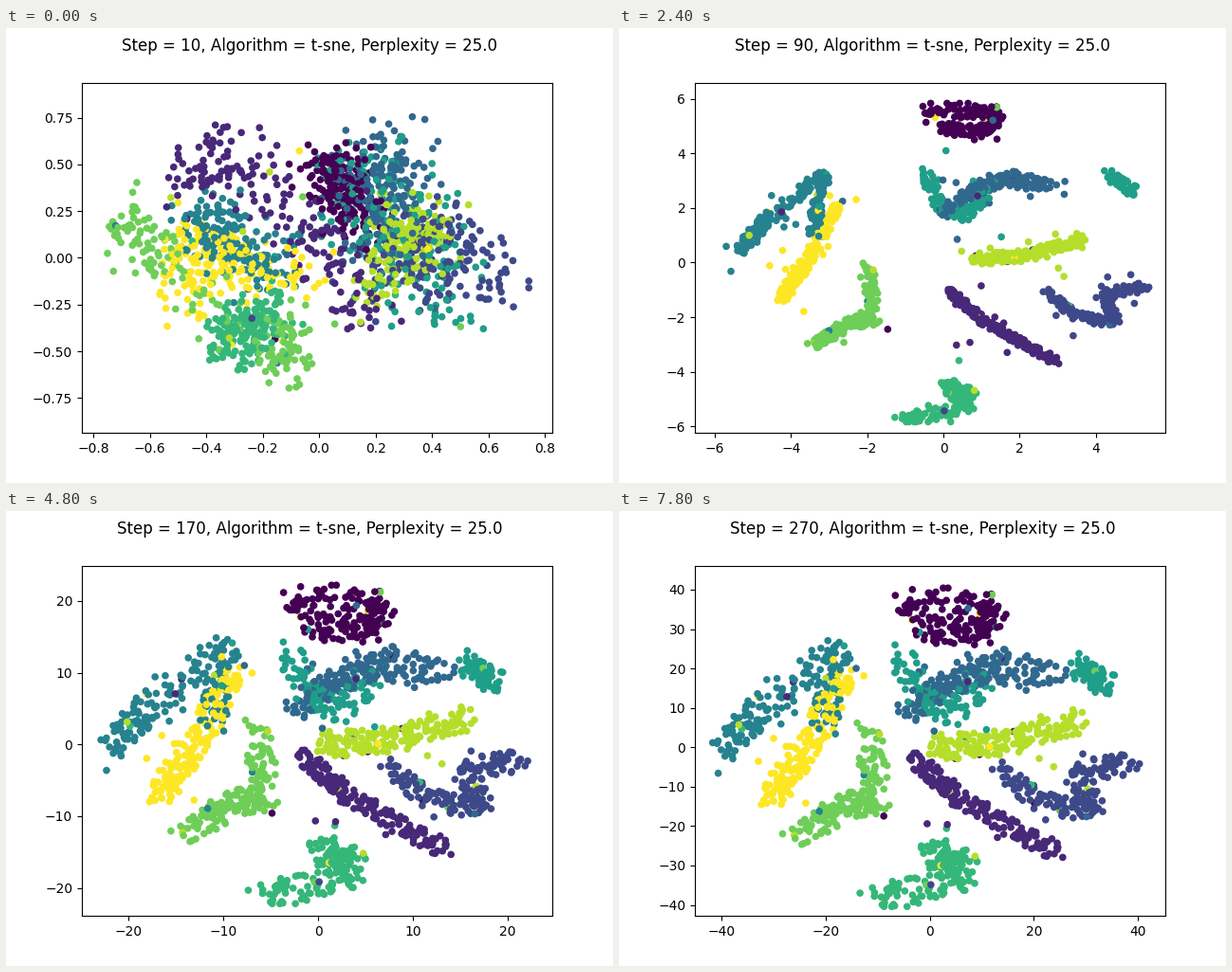
A matplotlib script that plays this animation: 640x480 px, repeating every 8 s.

```python
import numpy as np
import matplotlib.pyplot as plt
from matplotlib.animation import FuncAnimation

W, H, DPI = 640, 480, 100
INTERVAL, HOLD, FRAMES = 100, 3, 80
AXES_SIZE = np.array([W * 0.775, H * 0.77])
ZERO = np.array([332, 242])          # where data (0, 0) sits on the stage
FIRST, LAST = (103, 74), (553, 410)  # corners of the populated area

rng = np.random.default_rng(7)
poses, labels = [], []


def along(points, u):
    """Walk a polyline; u runs from 0 to 1."""
    leg = u * (len(points) - 1)
    return np.column_stack([np.interp(leg, range(len(points)), axis)
                            for axis in zip(*points)])


def linger(u, legs):
    """Slow down near the key points, so that a path breaks into clumps."""
    leg = np.minimum((u * legs).astype(int), legs - 1)
    t = u * legs - leg
    return (leg + t * t * (3 - 2 * t)) / legs


def group(label, n, cloud, blur, path, brush):
    """Points of one digit: blurred cloud, tight strand, spread-out island."""
    u = (np.arange(n) + 0.5) / n
    start = along(cloud, linger(u, len(cloud) - 1)) + rng.normal(0, blur, (n, 2))

    angle = rng.uniform(0, 2 * np.pi, n)
    radius = brush * np.sqrt(rng.random(n))
    disc = np.column_stack([radius * np.cos(angle), radius * np.sin(angle)])
    stray = (rng.random((n, 1)) < 0.06) * rng.normal(0, 18, (n, 2))

    line, centre = along(path, u), np.mean(path, axis=0)
    tight = ZERO + 1.1 * (centre - ZERO) + 0.75 * (line - centre) + 0.45 * disc
    keys = [start, tight + stray, tight + stray, line + disc + stray]
    keys = (np.clip(keys, FIRST, LAST) - ZERO) * [1, -1] / AXES_SIZE
    poses.append(np.concatenate([keys, keys[-1:]]))
    labels.extend([label] * n)


group(0, 180, [(345, 152), (355, 165), (375, 200)], 18,
      [(292, 92), (400, 95), (390, 118), (320, 118)], 16)
group(1, 180, [(190, 154), (240, 140), (330, 220), (386, 304)], 17,
      [(320, 256), (365, 297), (468, 354)], 11)
group(2, 180, [(410, 235), (425, 245), (480, 230), (520, 260)], 25,
      [(410, 265), (450, 300), (505, 308), (490, 268), (548, 258)], 13)
group(3, 180, [(400, 215), (392, 165), (406, 128)], 24,
      [(312, 205), (350, 170), (400, 155), (455, 165)], 19)
group(4, 180, [(205, 200), (235, 222), (290, 248)], 18,
      [(115, 245), (150, 205), (235, 135), (220, 220)], 16)
group(5, 110, [(420, 225), (380, 150)], 30,
      [(300, 145), (320, 190), (360, 205), (390, 175)], 17)
group(5, 70, [(435, 250), (460, 280)], 30,
      [(487, 155), (520, 178)], 14)
group(6, 180, [(280, 295), (240, 328), (260, 318)], 16,
      [(268, 400), (365, 385), (335, 352), (370, 365)], 16)
group(7, 180, [(132, 205), (155, 240), (295, 355), (300, 320)], 17,
      [(190, 333), (240, 305), (275, 300), (268, 225)], 16)
group(8, 180, [(390, 265), (437, 214), (430, 222)], 20,
      [(335, 242), (410, 238), (490, 214)], 14)
group(9, 180, [(195, 284), (200, 225), (245, 255), (315, 260)], 18,
      [(165, 295), (200, 245), (245, 160)], 15)

order = rng.permutation(len(labels))
POSES = np.concatenate(poses, axis=1)[:, order]
LABELS = np.array(labels)[order]
mixed = rng.random(len(LABELS)) < 0.025
LABELS[mixed] = rng.integers(0, 10, mixed.sum())

# Per pose: its step and the axis limits; between poses, an easing power.
KEY_STEPS = [10, 50, 90, 130, 270]
LIMITS = np.array([  # x min, x max, y min, y max
    (-0.841, 0.826, -0.936, 0.937),
    (-6.05, 5.70, -5.17, 5.83),
    (-6.52, 5.82, -6.24, 6.59),
    (-14.73, 14.36, -14.41, 14.28),
    (-45.2, 45.3, -42.8, 46.1)])
EASING = [2, 1, 0.7, 1.21]

fig, ax = plt.subplots(figsize=(W / DPI, H / DPI), dpi=DPI)
title = fig.suptitle("", fontsize=12)
dots = ax.scatter(*POSES[0].T, c=LABELS, s=20, cmap="viridis", vmin=0, vmax=9)


def update(frame):
    step = 10 + 10 * (frame // HOLD)
    k = min(np.searchsorted(KEY_STEPS, step, side="right") - 1, len(EASING) - 1)
    t = (step - KEY_STEPS[k]) / (KEY_STEPS[k + 1] - KEY_STEPS[k])
    t = 1 - (1 - t) ** EASING[k]
    points = POSES[k] + t * (POSES[k + 1] - POSES[k])
    x0, x1, y0, y1 = LIMITS[k] + t * (LIMITS[k + 1] - LIMITS[k])
    ax.set(xlim=(x0, x1), ylim=(y0, y1))
    dots.set_offsets(points * [x1 - x0, y1 - y0])
    title.set_text(f"Step = {step}, Algorithm = t-sne, Perplexity = 25.0")
    return dots, title


anim = FuncAnimation(fig, update, frames=FRAMES, interval=INTERVAL,
                     repeat=True, repeat_delay=0)
plt.show()
```
